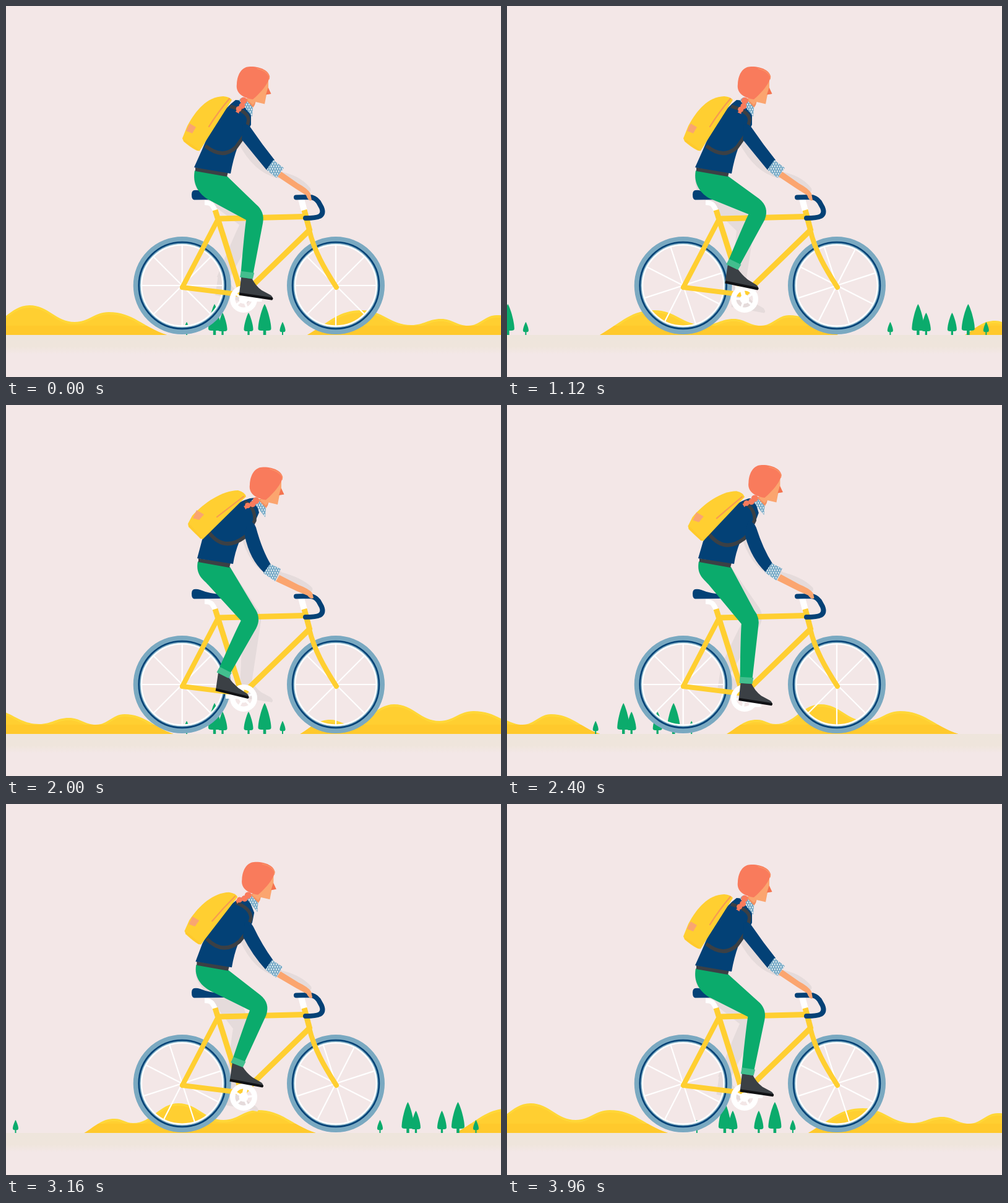
These frames come from a looping animation (800x600 px, 4 s). An HTML page with a canvas:

```html
<!DOCTYPE html>
<html lang="en">
<head>
<meta charset="utf-8">
<title>Bicycle ride</title>
<style>
html, body { margin: 0; width: 100%; height: 100%; overflow: hidden; background: #f3e7e7; }
canvas { display: block; }
</style>
</head>
<body>
<canvas id="stage" width="800" height="600"></canvas>
<script>
const ctx = document.getElementById('stage').getContext('2d');
const C = {
  bg: '#f3e7e7', shade: '#e5dbdb', yellow: '#ffcf31', gold: '#ffc92c', light: '#ffd737',
  green: '#0bab6c', cuff: '#43be8e', navy: '#034176', steel: '#7aa9c1', dark: '#3b4045',
  skin: '#fba56f', hair: '#f97b5c', nose: '#f47350', white: '#fff'
};
const LOOP = 4000, STEP = 40, DEG = Math.PI / 180;

// Keyed values in animation steps, [step, value]
const crankKeys = [[-1, -10], [0, -3], [18, 176], [38, 344], [50, 552], [70, 912], [88, 1054], [99, 1070], [100, 1077], [101, 1085]];
const leanKeys = [[0, 0], [28, 0], [38, .78], [50, 1], [60, .83], [72, .81], [86, 0], [100, 0]];
const braidKeys = [[0, 120], [14, 115], [29, 115], [38, 118], [50, 149], [70, 150], [88, 154], [99, 122], [100, 120]];
const slipKeys = [[0, 0], [18, 18], [38, 18], [50, 0], [100, 0]];

// Monotone cubic interpolation
function track(keys, x) {
  const slope = i => (keys[i + 1][1] - keys[i][1]) / (keys[i + 1][0] - keys[i][0]);
  const tangent = i => {
    if (i === 0) return slope(0);
    if (i === keys.length - 1) return slope(i - 1);
    const a = slope(i - 1), b = slope(i);
    return a * b <= 0 ? 0 : 2 * a * b / (a + b);
  };
  let i = 0;
  while (i < keys.length - 2 && x >= keys[i + 1][0]) i++;
  const [x0, y0] = keys[i], [x1, y1] = keys[i + 1];
  const w = x1 - x0, u = (x - x0) / w, u2 = u * u, u3 = u2 * u;
  return y0 * (2 * u3 - 3 * u2 + 1) + y1 * (3 * u2 - 2 * u3)
    + w * (tangent(i) * (u3 - 2 * u2 + u) + tangent(i + 1) * (u3 - u2));
}

function fill(d, color) {
  ctx.fillStyle = color;
  ctx.fill(new Path2D(d));
}

function line(d, color, width, cap = 'round') {
  ctx.strokeStyle = color;
  ctx.lineWidth = width;
  ctx.lineCap = cap;
  ctx.lineJoin = 'round';
  ctx.stroke(new Path2D(d));
}

function disc(x, y, r, color) {
  ctx.fillStyle = color;
  ctx.beginPath();
  ctx.arc(x, y, r, 0, 7);
  ctx.fill();
}

function ring(x, y, r, color, width) {
  ctx.strokeStyle = color;
  ctx.lineWidth = width;
  ctx.beginPath();
  ctx.arc(x, y, r, 0, 7);
  ctx.stroke();
}

// ---- scenery ----
const GROUND = 532, HILL_SPAN = 1191, TREE_SPAN = 744;
const ranges = [
  { x: 487, pts: [[0, 532], [88, 492], [168, 516], [216, 506], [260, 517], [306, 500], [385, 532]] },
  { x: -114, pts: [[0, 532], [49, 509], [79, 516], [152, 484], [225, 511], [280, 495], [374, 532]] }
];
const trees = [[0, 21, 9], [45, 50, 20], [58, 36, 15], [100, 36, 15], [126, 50, 21], [155, 21, 9]];

function rangePath(pts) {
  let d = `M0,${GROUND}`;
  for (let i = 1; i < pts.length; i++) {
    const [x0, y0] = pts[i - 1], [x1, y1] = pts[i], w = x1 - x0;
    const ya = i === 1 ? y0 + (y1 - y0) * .55 : y0;
    const yb = i === pts.length - 1 ? y1 + (y0 - y1) * .35 : y1;
    d += `C${x0 + w * .42},${ya} ${x1 - w * .42},${yb} ${x1},${y1}`;
  }
  return d + 'Z';
}

function drawHills(step) {
  const shift = HILL_SPAN * step / 99;
  for (const { x, pts } of ranges) {
    const d = rangePath(pts);
    for (let k = 0; k < 3; k++) {
      const left = x - shift + k * HILL_SPAN;
      if (left > 800 || left < -400) continue;
      ctx.save();
      ctx.translate(left, 0);
      fill(d, C.light);
      ctx.clip(new Path2D(d));
      ctx.translate(0, 4);
      fill(d, C.yellow);
      ctx.fillStyle = C.gold;
      ctx.fillRect(0, 513, 400, 20);
      ctx.restore();
    }
  }
}

function drawTree(x, h, w) {
  const top = GROUND - h, base = GROUND - 3 - h * .08, r = w / 2;
  fill(`M${x},${top}C${x + r * .42},${top + h * .14} ${x + r},${base - h * .28} ${x + r},${base - 3}
    Q${x + r},${base} ${x + r * .5},${base}L${x - r * .5},${base}Q${x - r},${base} ${x - r},${base - 3}
    C${x - r},${base - h * .28} ${x - r * .42},${top + h * .14} ${x},${top}Z`, C.green);
  ctx.fillRect(x - w * .11, base - 1, w * .22, GROUND - base + 1);
}

function drawTrees(step) {
  const shift = TREE_SPAN * step / 50;
  for (let k = 0; k < 4; k++)
    for (const [dx, h, w] of trees) drawTree(292 + dx - shift + k * TREE_SPAN, h, w);
}

function drawGround() {
  const g = ctx.createLinearGradient(0, GROUND, 0, 563);
  g.addColorStop(0, '#eee5dc');
  g.addColorStop(.6, '#efe5dc');
  g.addColorStop(1, C.bg);
  ctx.fillStyle = g;
  ctx.fillRect(0, GROUND, 800, 31);
}

// ---- bicycle ----
const HUB = { x: 384, y: 474 }, CRANK = 19.5;

function drawWheel(x, spin) {
  const y = 452;
  for (let i = 0; i < 8; i++) {
    const a = (spin + i * 45) * DEG;
    line(`M${x},${y}L${x + 66 * Math.cos(a)},${y + 66 * Math.sin(a)}`, C.white, 2.2);
  }
  ring(x, y, 66, C.white, 3);
  ring(x, y, 73, C.steel, 12);
  ring(x, y, 70, C.navy, 2.6);
}

function drawFrame() {
  line('M321,318Q330,318 333,322T338,331', C.white, 8, 'butt');
  line('M477,312L482,331', C.white, 10, 'butt');
  line('M338,330L380,464', C.yellow, 9, 'butt');
  line('M342,346L285,455', C.yellow, 8);
  line('M285,455L382,467', C.yellow, 8);
  line('M344,344L484,340.5', C.yellow, 9, 'butt');
  line('M490,363L386,464', C.yellow, 9);
  line('M482,330L491,364', C.yellow, 9, 'butt');
  line('M490,362C498,396 514,424 534,455', C.yellow, 8);
  fill('M304,298Q308,297 314,299Q328,305 348,306Q353,307 352,313L304,313.5Q300,313 300,305Q300,299 304,298Z', C.navy);
}

function pedal(deg) {
  return { x: HUB.x + CRANK * Math.cos(deg * DEG), y: HUB.y + CRANK * Math.sin(deg * DEG) };
}

function drawCrank(deg) {
  ring(HUB.x, HUB.y, 17.8, C.white, 8.5);
  for (let i = 0; i < 5; i++) {
    const a = (deg + i * 72) * DEG;
    line(`M${HUB.x},${HUB.y}l${16 * Math.cos(a)},${16 * Math.sin(a)}`, C.white, 3.5);
  }
  disc(HUB.x, HUB.y, 7.5, C.white);
  disc(HUB.x, HUB.y, 3, '#f6eded');
  const p = pedal(deg);
  line(`M${HUB.x},${HUB.y}L${p.x},${p.y}`, C.white, 7);
  ctx.fillStyle = C.white;
  ctx.fillRect(p.x - 10, p.y - 2, 20, 7);
}

function drawBars() {
  line('M469,309.5L490,309Q499,309 505,317L510,326Q514,336 507,340Q501,343 484,343', C.navy, 8);
}

// ---- rider ----
const THIGH = 97, SHIN = 101;

function drawLeg(deg, { hip, waistL, waistR, rise }, flat) {
  const p = pedal(deg), sole = { x: p.x, y: p.y - 2 };
  const A = { x: sole.x - 15, y: sole.y - 31 };
  const dx = A.x - hip.x, dy = A.y - hip.y, dist = Math.hypot(dx, dy);
  const bend = Math.acos((THIGH ** 2 + dist ** 2 - SHIN ** 2) / (2 * THIGH * dist));
  const a = Math.atan2(dy, dx) - bend;
  const u = { x: Math.cos(a), y: Math.sin(a) }, n = { x: u.y, y: -u.x };
  const K = { x: hip.x + THIGH * u.x, y: hip.y + THIGH * u.y };
  const v = { x: (A.x - K.x) / SHIN, y: (A.y - K.y) / SHIN }, m = { x: v.y, y: -v.x };
  const at = (o, d, k, e = d, j = 0) => `${o.x + d.x * k + e.x * j},${o.y + d.y * k + e.y * j}`;

  // shoe: the sole tilts, the ankle stays upright
  const tilt = (11 - 2.7 * Math.cos(deg * DEG)) * DEG, c = Math.cos(tilt), s = Math.sin(tilt);
  const f = (x, y) => `${sole.x + x * c - y * s},${sole.y + x * s + y * c}`;
  fill(`M${f(-27, -2)}L${at(A, m, -8.5, v, -2)}L${at(A, m, 8, v, -2)}Q${f(-3, -18)} ${f(8, -12.5)}
    L${f(22, -7.5)}Q${f(27, -6)} ${f(28, -1)}Z`, flat || C.dark);
  fill(`M${f(-27, -3.5)}L${f(27, -3.5)}Q${f(29, -2)} ${f(27, .8)}L${f(-27, .8)}Z`, flat || '#101114');

  const sum = { x: n.x + m.x, y: n.y + m.y }, len = Math.hypot(sum.x, sum.y);
  const back = { x: -sum.x / len, y: -sum.y / len };
  const seat = 18 - 9 * rise, under = 7.5 * rise - 20.5;
  fill(`M${waistL.x},${waistL.y}C${waistL.x - 4},${waistL.y + 22} ${at(hip, u, seat - 17 + 6 * rise, n, under)} ${at(hip, u, seat, n, under)}
    L${at(K, back, 26 / len)}Q${at(K, v, 36, m, -13)} ${at(A, m, -9.5)}L${at(A, m, 9.5)}
    L${at(K, v, 9, m, 14.5)}Q${at(K, back, -18)} ${at(K, u, -9, n, 17)}L${waistR.x},${waistR.y}Z`, flat || C.green);
  if (!flat)
    fill(`M${at(A, m, -10.5)}L${at(A, m, 10.5)}L${at(A, m, 11.5, v, -10)}L${at(A, m, -10, v, -10)}Z`, C.cuff);
}

function dotted(d, x, y, w, h) {
  ctx.save();
  fill(d, '#78abc7');
  ctx.clip(new Path2D(d));
  ctx.fillStyle = '#f3f5f6';
  for (let r = 0; r * 4 < h; r++)
    for (let c = 0; c * 4 < w; c++) ctx.fillRect(x + c * 4 + r % 2 * 2, y + r * 4, 1.5, 2.6);
  ctx.restore();
}

function drawHead(lean, braid) {
  ctx.save();
  ctx.translate(21 * lean, 21.9 * lean * lean - 19.4 * lean);
  fill('M387,150L406,146L402,160L397,168Z', '#f4905f');
  dotted('M376,152L383,147L399,164L398,179L385,163Z', 374, 146, 28, 34);
  fill('M424,112L424,132L428,142L421,143L418,158.5L403,155L399,160L390,152L400,130Z', C.skin);
  fill('M423.5,132L428.5,142L420,143.5Z', C.nose);
  fill('M373,126C374,108 383,97 396,98C412,98 425,105 426,114C425,124 413,139 399,151C391,150 370,145 373,126Z', C.hair);
  line('M406,101Q422,105 425.5,114L425,118', '#fa9265', 1.6);
  const a = braid * DEG;
  [[3, 5.5], [11, 5], [18.5, 4.5]].forEach(([k, r], i) => {
    const side = i % 2 ? 1 : -.5;
    disc(386 + k * Math.cos(a) + side, 151 + k * Math.sin(a) + side, r, C.hair);
  });
  const tip = k => `${386 + 25 * Math.cos(a + k)},${151 + 25 * Math.sin(a + k)}`;
  fill(`M${386 + 16 * Math.cos(a)},${151 + 16 * Math.sin(a)}L${tip(-.13)}L${tip(.13)}Z`, C.hair);
  ctx.restore();
}

function drawBag(p) {
  const body = `M${p(285, 214, 294, 192)}L${p(293, 194, 301, 179)}C${p(307, 168, 320, 158)} ${p(325, 147, 350, 138)} ${p(351, 146, 375, 138)}
    Q${p(362, 147, 386, 141)} ${p(365, 152, 388, 148)}L${p(313, 234, 318, 217)}Q${p(307, 236, 314, 217)} ${p(287, 219, 295, 197)}Z`;
  fill(body, C.yellow);
  line(`M${p(289, 218, 297, 195)}L${p(309, 232, 315, 215)}`, C.gold, 3);
  line(`M${p(328, 195, 341, 181)}Q${p(343, 171, 362, 165)} ${p(361, 150, 384, 148)}`, '#f79a52', 2.2);
  fill(`M${p(297, 190, 308, 170)}L${p(307, 196, 320, 177)}L${p(301, 206, 312, 186)}L${p(291, 202, 302, 183)}Z`, '#f9a571');
}

function drawTorso(p, low, lean, braid) {
  fill(`M${low(306, 261, 311, 248)}L${low(359, 268, 363, 255)}L${low(357, 276, 361, 263)}L${low(306, 267, 311, 254)}Z`, C.dark);
  fill(`M${p(371, 152, 394, 151)}Q${p(340, 175, 352, 162)} ${p(317, 232, 317, 218)}L${low(304, 261, 309, 248)}
    L${low(363, 271, 367, 257)}Q${p(367, 248, 370, 238)} ${p(374, 229, 377, 221)}L${p(386, 212, 389, 212)}
    L${p(396, 192, 401, 192)}L${p(396, 177, 409, 174)}L${p(384, 153, 403, 150)}Z`, C.navy);
  line(`M${p(322, 226, 328, 206)}Q${p(350, 249, 352, 238)} ${p(372, 228, 385, 214)}L${p(384, 211, 391, 210)}`, C.dark, 6, 'butt');
  line(`M${p(362, 162, 386, 156)}Q${p(391, 170, 403, 166)} ${p(392, 184, 402, 187)}L${p(390, 194, 396, 198)}`, C.dark, 5.5, 'butt');
  drawBag(p);
  drawHead(lean, braid);
  fill(`M${p(383, 192, 390, 188)}Q${p(390, 188, 399, 186)} ${p(397, 199, 404, 198)}Q${p(414, 224, 414, 235)} ${p(434, 249, 428, 258)}
    L${p(421, 265, 417, 271)}Q${p(402, 242, 394, 250)} ${p(381, 216, 386, 212)}Z`, C.navy);
}

function drawForearm(p) {
  fill(`M${p(445, 268, 442, 275)}L${p(472, 287, 473, 291)}Q${p(487, 295, 489, 297)} ${p(492, 303, 495, 304)}
    L${p(494, 314, 497, 312)}Q${p(489, 317, 493, 315)} ${p(485, 306, 487, 308)}L${p(469, 296, 470, 301)}
    L${p(439, 276, 436, 285)}Z`, C.skin);
  dotted(`M${p(432, 249, 427, 257)}L${p(449, 262, 444, 265)}L${p(437, 278, 435, 285)}L${p(421, 265, 416, 272)}Z`, 414, 246, 38, 42);
}

function draw(step) {
  const lean = track(leanKeys, step), crank = track(crankKeys, step);
  const spin = step * 18 + track(slipKeys, step), braid = track(braidKeys, step);
  const rise = Math.min(1, lean * 1.2);
  const blend = k => (x0, y0, x1, y1) => `${x0 + (x1 - x0) * k},${y0 + (y1 - y0) * k}`;
  const p = blend(lean), low = blend(rise);
  const body = {
    rise,
    hip: { x: 322 + 8 * rise, y: 285 - 10 * rise },
    waistL: { x: 305 + 5 * rise, y: 266 - 13 * rise },
    waistR: { x: 357 + 5 * rise, y: 275 - 13 * rise }
  };

  ctx.fillStyle = C.bg;
  ctx.fillRect(0, 0, 800, 600);
  drawGround();
  drawHills(step);
  drawTrees(step);

  drawLeg(crank + 180, body, C.shade);
  line(`M${p(381, 218, 388, 216)}Q${p(405, 264, 404, 266)} ${p(440, 272, 440, 274)}`, C.shade, 13);
  line(`M${p(440, 272, 440, 274)}Q${p(472, 277, 474, 282)} ${p(488, 297, 491, 298)}`, C.shade, 9);

  drawWheel(284.7, spin);
  drawWheel(533, spin);
  drawFrame();
  drawCrank(crank);
  drawLeg(crank, body);
  drawTorso(p, low, lean, braid);
  drawBars();
  drawForearm(p);
}

function tick() {
  draw(Math.floor(performance.now() % LOOP / STEP));
  requestAnimationFrame(tick);
}
tick();
</script>
</body>
</html>
```
